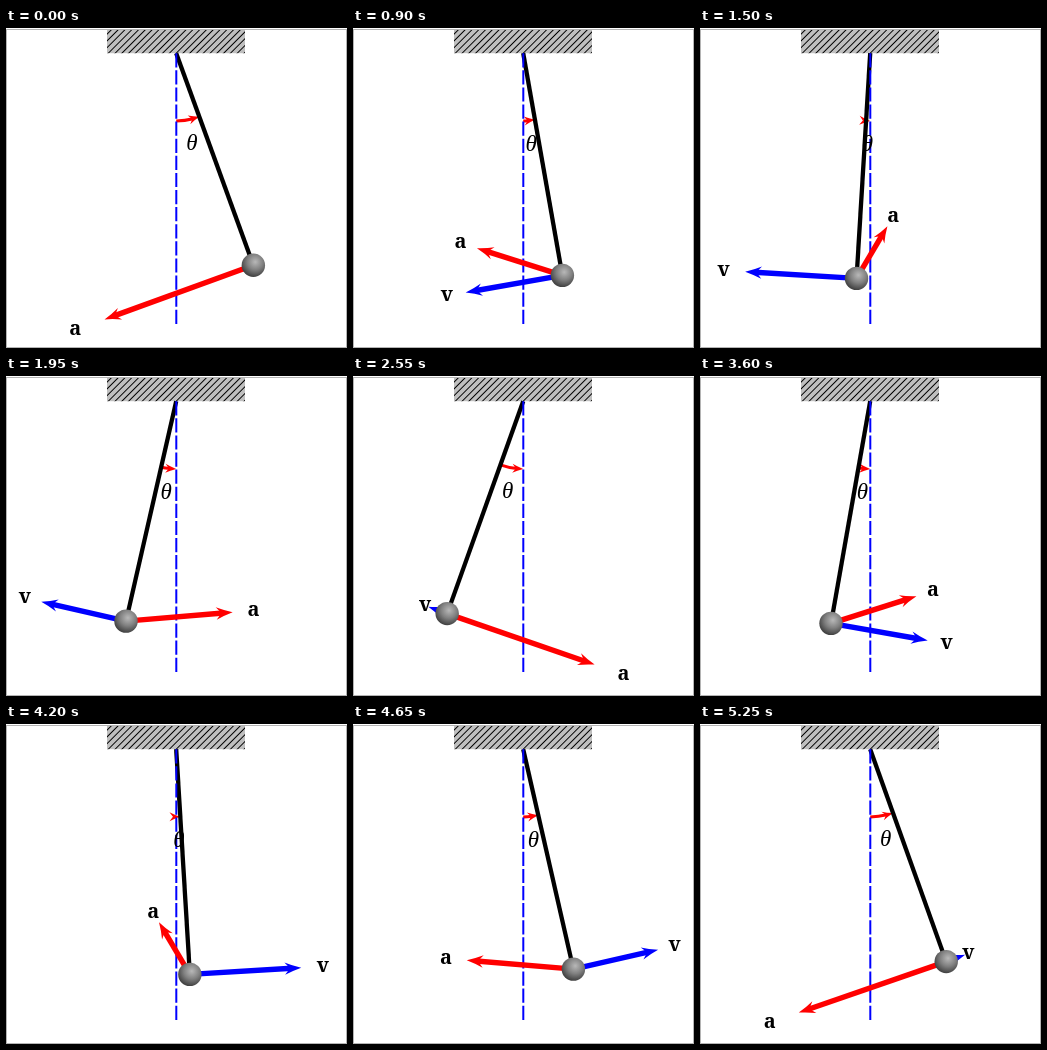
Animation, 341 px wide and 320 px high, one loop 5400 ms. Source, as an HTML page:

```html
<!DOCTYPE html>
<html lang="en">
<head>
<meta charset="utf-8">
<title>Pendulum: velocity and acceleration</title>
<style>
  html, body { margin: 0; width: 100%; height: 100%; overflow: hidden; background: #fff; }
  svg { display: block; width: 341px; height: 320px; }
  text { text-anchor: middle; }
  .label { font: 600 20px "Noto Serif", "Liberation Serif", serif; }
  #theta { font: italic 23px "Liberation Serif", "Noto Serif", serif; }
</style>
</head>
<body>
<svg viewBox="0 0 341 320">
  <defs>
    <pattern id="hatch" width="4.8" height="4.8" patternUnits="userSpaceOnUse" patternTransform="translate(166.8 25.2) rotate(45)">
      <path d="M2.4 0V4.8" stroke="#000" stroke-width="1"/>
    </pattern>
    <radialGradient id="shade" cx=".58" cy=".36" r=".68">
      <stop offset="0" stop-color="#b8b8b8"/>
      <stop offset=".5" stop-color="#808080"/>
      <stop offset="1" stop-color="#383838"/>
    </radialGradient>
  </defs>
  <rect x=".5" y="1.5" width="340" height="318" fill="#fff" stroke="#b4b4b4"/>
  <rect x="101" y="2" width="138" height="23.2" fill="#bfbfbf"/>
  <rect x="101" y="2" width="138" height="23.2" fill="url(#hatch)"/>
  <g id="angle" fill="none" stroke="#f00" stroke-width="3">
    <path class="shaft"/><path class="head" fill="#f00" stroke="none"/>
  </g>
  <path id="rod" stroke="#000" stroke-width="4.3"/>
  <path d="M170.3 25.2V296" stroke="#00f" stroke-width="2" stroke-dasharray="14.2 2.9"/>
  <g id="velocity" stroke="#00f" fill="#00f" stroke-width="5.4">
    <path class="shaft"/><path class="head" stroke="none"/>
  </g>
  <g id="acceleration" stroke="#f00" fill="#f00" stroke-width="5.4">
    <path class="shaft"/><path class="head" stroke="none"/>
  </g>
  <circle id="bob" r="11.7" fill="url(#shade)"/>
  <text id="theta">θ</text>
  <text id="v" class="label">v</text>
  <text id="a" class="label">a</text>
</svg>
<script>
const STEP = 150, STEPS = 36;
const PIVOT = { x: 170.2, y: 25.2 }, LENGTH = 225.6;
const SWING = Math.PI / 9;
const V_MAX = LENGTH / 2, A_MAX = LENGTH * 0.7;
const ARC = LENGTH * 0.3;
const { sin, cos, hypot, atan2, PI } = Math;
const $ = id => document.getElementById(id);

const polar = (r, angle) => ({ x: PIVOT.x + r * sin(angle), y: PIVOT.y + r * cos(angle) });
const along = (p, d, k) => ({ x: p.x + d.x * k, y: p.y + d.y * k });
const xy = p => `${p.x.toFixed(2)} ${p.y.toFixed(2)}`;

function placeHead(group, tip, direction, size, half) {
  const head = group.querySelector(".head");
  head.setAttribute("d", `M0 0Q${-size * 0.55} ${-half * 0.42} ${-size} ${-half}L${-size * 0.68} 0L${-size} ${half}Q${-size * 0.55} ${half * 0.42} 0 0Z`);
  head.setAttribute("transform", `translate(${xy(tip)}) rotate(${direction * 180 / PI})`);
}

function placeText(id, p, drop) {
  $(id).setAttribute("x", p.x);
  $(id).setAttribute("y", p.y + drop);
}

function drawVector(id, label, from, vector) {
  const size = hypot(vector.x, vector.y), visible = size > 0.5;
  $(id).style.display = $(label).style.display = visible ? "" : "none";
  if (!visible) return;
  const tip = along(from, vector, 1 + 0.5 / size);
  const neck = along(from, vector, Math.max(0, 1 - 9 / size));
  $(id).querySelector(".shaft").setAttribute("d", `M${xy(from)}L${xy(neck)}`);
  placeHead($(id), tip, atan2(vector.y, vector.x), 16.5, 6.2);
  placeText(label, along(from, vector, 1.2), 5.2);
}

// The arc always runs counterclockwise, between the vertical and the rod.
function drawAngle(angle) {
  const start = Math.min(0, angle), end = Math.max(0, angle);
  const neck = end - 6.5 / ARC;
  $("angle").querySelector(".shaft").setAttribute("d",
    neck > start ? `M${xy(polar(ARC, start))}A${ARC} ${ARC} 0 0 0 ${xy(polar(ARC, neck))}` : "");
  placeHead($("angle"), polar(ARC, end), -(end - 4 / ARC), 10.8, 4.5);
  placeText("theta", polar(LENGTH * 0.4, angle / 2), 7.8);
}

function draw(time) {
  const phase = Math.floor(time / STEP) % STEPS / STEPS * 2 * PI;
  const angle = SWING * cos(phase);
  const bob = polar(LENGTH, angle);
  const tangent = { x: cos(angle), y: -sin(angle) };
  const inward = { x: -sin(angle), y: -cos(angle) };
  const speed = -V_MAX * sin(phase);
  const pull = -A_MAX * cos(phase), centripetal = A_MAX * SWING * sin(phase) ** 2;

  $("rod").setAttribute("d", `M${xy(PIVOT)}L${xy(bob)}`);
  $("bob").setAttribute("cx", bob.x);
  $("bob").setAttribute("cy", bob.y);
  drawAngle(angle);
  drawVector("velocity", "v", bob, along({ x: 0, y: 0 }, tangent, speed));
  drawVector("acceleration", "a", bob, along(along({ x: 0, y: 0 }, tangent, pull), inward, centripetal));
}

const began = performance.now();
function tick() {
  draw(performance.now() - began);
  requestAnimationFrame(tick);
}
tick();
</script>
</body>
</html>
```
